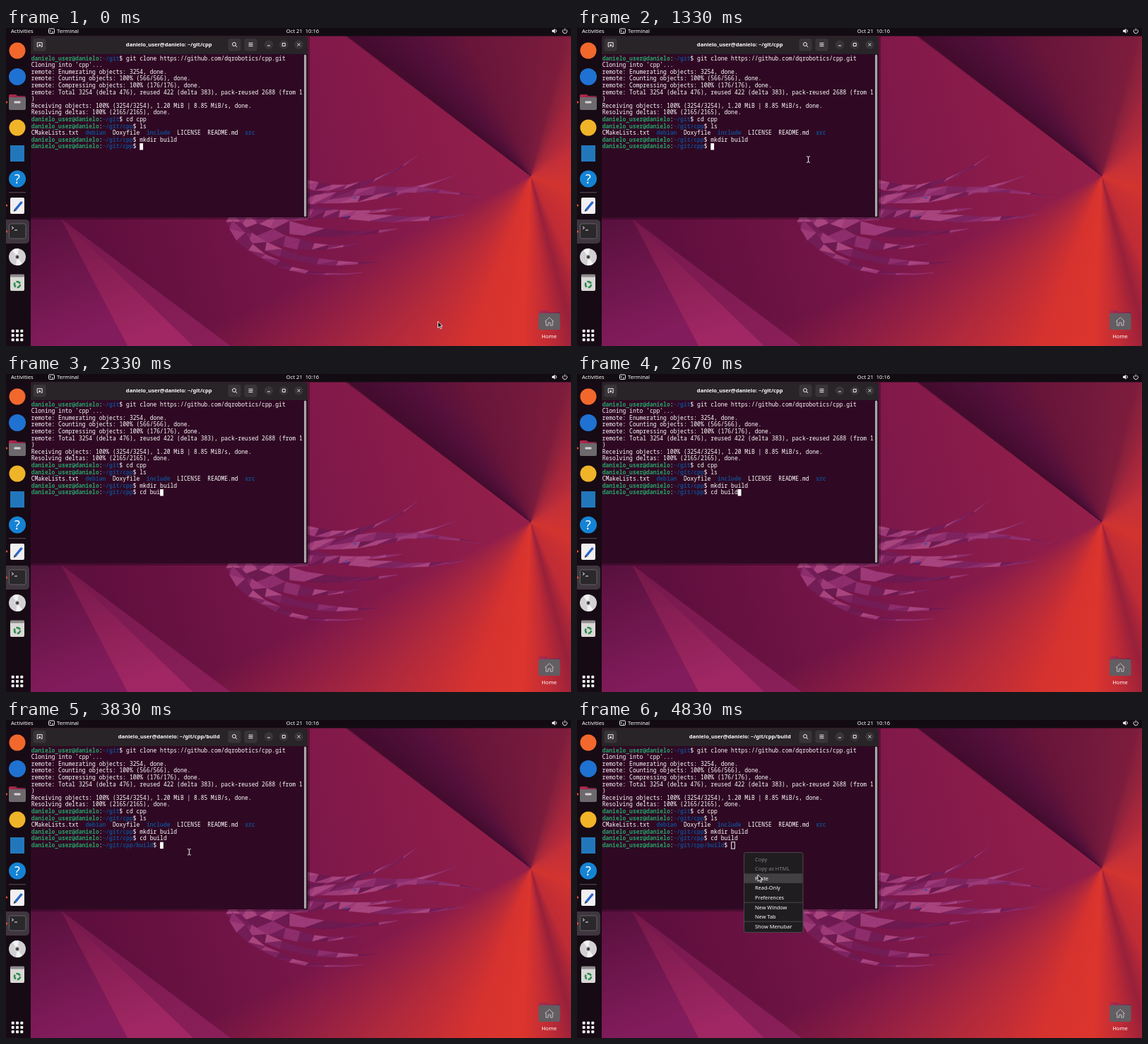
These frames come from a looping animation (800x450 px, 5000 ms). An HTML page:

```html
<!DOCTYPE html>
<html lang="en">
<head>
<meta charset="utf-8">
<title>Terminal session</title>
<style>
html, body { margin: 0; width: 100%; height: 100%; overflow: hidden; background: #120a12; }
/* The wallpaper's folds all meet in one point, so they are an angular gradient. */
svg {
  display: block; width: 800px; height: 450px;
  background:
    conic-gradient(at 743px 210px,
      #751a3c 0deg, #7d1c3c 14deg, #8a213c 18deg, #a3263c 29deg, #c43038 60deg,
      #d2342f 110deg, #c02c35 155deg, #98203a 165deg, #c22c35 174deg, #dc352d 183deg,
      #d6322f 200deg, #b0293c 222deg, #98204a00 245deg, #98204a00 307deg,
      #430b2e 307.5deg, #54103a 320deg, #681539 335deg, #751a3c 360deg),
    linear-gradient(76deg, #5f0f3d 18%, #7b174a 52%, #98204a 92%);
}
text { white-space: pre; fill: #fff; }
.ui { font: 7.6px "Noto Sans", "Open Sans", sans-serif; }
.bold { font-weight: 700; }
.mono { font: 8px "Noto Sans Mono", "DejaVu Sans Mono", monospace; }
.user { fill: #26a269; font-weight: 700; }
.dir { fill: #12488b; font-weight: 700; }
.off { fill: #858285; }
.mid { text-anchor: middle; }
.line { fill: none; stroke: #eee; stroke-width: 1; }
</style>
</head>
<body>
<svg id="stage" viewBox="0 0 800 450">
  <defs>
    <linearGradient id="left" x1="0" y1="0" x2=".3" y2="1">
      <stop offset="0" stop-color="#57103d"/><stop offset="1" stop-color="#831c5c"/>
    </linearGradient>
    <linearGradient id="shard" x1="0" y1="0" x2=".4" y2="1">
      <stop offset="0" stop-color="#741848"/><stop offset="1" stop-color="#a02763"/>
    </linearGradient>
    <linearGradient id="fold" x1="0" y1="0" x2="1" y2="1">
      <stop offset="0" stop-color="#75184d"/><stop offset="1" stop-color="#8b1f5a"/>
    </linearGradient>
    <linearGradient id="folder" x1="0" y1="0" x2="1" y2="0">
      <stop offset="0" stop-color="#b52a4a"/><stop offset="1" stop-color="#7a1f4c"/>
    </linearGradient>
  </defs>

  <g id="wallpaper">
    <path d="M35 268H78L172 450H35Z" fill="url(#left)"/>
    <path d="M78 270L318 450H264Z" fill="url(#fold)"/>
    <path d="M78 270L265 450H172Z" fill="url(#shard)"/>
    <g id="jelly"></g>
  </g>

  <rect width="800" height="11.5" fill="#120c12"/>
  <rect y="11" width="35" height="439" fill="#160b14"/>
  <text class="ui" x="7" y="7.4">Activities</text>
  <rect class="line" x="60.5" y="1" width="8" height="6.5" rx="1.2"/>
  <path class="line" d="M62 3l1.5 1.2L62 5.4M65 5.6h2" stroke-width=".7"/>
  <text class="ui" x="72" y="7.4">Terminal</text>
  <text class="ui mid" x="420" y="7.4">Oct 21  10:16</text>
  <path d="M773 2.8h2l2.4-2v7l-2.4-2h-2z" fill="#eee"/>
  <path class="line" d="M778.6 2.2q1.8 2 0 4"/>
  <path class="line" d="M789.3 2.2a3.1 3.1 0 1 0 4 0M791.3 .6v3.4"/>

  <g id="dock">
    <circle cx="16" cy="32" r="11.5" fill="#f2682c"/>
    <circle cx="16" cy="69" r="12" fill="#1f72d2"/>
    <path d="M4 96q0-2 2-2h8l2 2h10q2 0 2 2v5H4z" fill="url(#folder)"/>
    <rect x="4" y="98" width="24" height="18" rx="2" fill="#6d696d"/>
    <rect x="11.5" y="103.5" width="9" height="3" rx="1" fill="#d6d2d6"/>
    <circle cx="16" cy="141" r="11.5" fill="#f0b429"/>
    <rect x="6" y="166" width="20" height="23" fill="#2277bb"/>
    <circle cx="16" cy="213.5" r="12" fill="#1583d4"/>
    <text class="ui mid" x="16" y="220" style="font-size:18px">?</text>
    <path d="M4 232.7h24" stroke="#5b505a"/>
    <rect x="6" y="240" width="20" height="23" rx="2" fill="#f1eff0"/>
    <path d="M13 257.5L22.5 246" stroke="#2867c9" stroke-width="3.4"/>
    <path d="M10.7 260l1-3.8 2.6 2.4z" fill="#333"/>
    <rect x="-4" y="271" width="37" height="34" rx="5" fill="#403640"/>
    <rect x="4.5" y="277" width="23.5" height="21" rx="2.5" fill="#2b282c" stroke="#646064"/>
    <path class="line" d="M8 281l2.6 1.8L8 284.6M12 286h4"/>
    <circle cx="16" cy="324" r="12" fill="#d2d0d2"/>
    <path d="M16 324L9 314.2A12 12 0 0 1 18 312.2ZM16 324L23 333.8A12 12 0 0 1 14 335.8Z" fill="#f3f2f3"/>
    <circle cx="16" cy="324" r="3.6" fill="#8d898d" stroke="#f5f5f5"/>
    <circle cx="16" cy="324" r="1.5" fill="#2b1b28"/>
    <rect x="6" y="349" width="20" height="23" rx="2" fill="#d9d8d6"/>
    <rect x="6" y="348.5" width="20" height="4" rx="1.5" fill="#8e8b8d"/>
    <circle cx="16" cy="363" r="4" fill="none" stroke="#2d8a4c" stroke-width="2.6" stroke-dasharray="6.4 2"/>
    <g id="marks" fill="#e04a2d"></g>
    <g id="apps" fill="#eee"></g>
  </g>

  <g id="home">
    <path d="M754 402q0-2.5 2.5-2.5h9l2.5 2.5h14q2.5 0 2.5 2.5v5h-30.5z" fill="url(#folder)"/>
    <rect x="754" y="403.5" width="30.5" height="23.5" rx="2.5" fill="#625e62"/>
    <path d="M763 415.5l6.3-6 6.3 6M764.7 414.5v6.500h3v-4h3.200v4h3v-6.500" class="line" style="stroke:#c5bfc3"/>
    <text class="ui mid" x="769" y="438.8">Home</text>
  </g>

  <g id="terminal">
    <path d="M33 12H430V271H33Z" fill="#1b0415" opacity=".35"/>
    <path d="M35 37V17q0-5.5 5.5-5.5H421.500q5.5 0 5.5 5.5V37Z" fill="#282427"/>
    <rect x="35" y="37" width="392" height="231" fill="#2f0923"/>
    <rect x="420.8" y="37" width="6.2" height="231" fill="#1f0a1a"/>
    <rect x="422" y="37.5" width="3.3" height="229.5" rx="1.6" fill="#aaa4a8"/>
    <g fill="#383438">
      <rect x="38.5" y="15" width="18" height="17.5" rx="3"/>
      <rect x="314.5" y="15" width="18" height="17.5" rx="3"/>
      <rect x="337.5" y="15" width="18" height="17.5" rx="3"/>
      <circle cx="372" cy="23.5" r="6.3"/><circle cx="393.3" cy="23.5" r="6.3"/><circle cx="414.5" cy="23.5" r="6.3"/>
    </g>
    <path class="line" d="M46 26.5h-1.8v-5.800h7v5.800h-1.800M47.7 22.5v4M45.8 24.5h3.8" stroke-width=".9"/>
    <circle class="line" cx="323" cy="23" r="2.5"/>
    <path class="line" d="M325 25l2.2 2.2M343.5 21.300h6M343.5 23.500h6M343.5 25.700h6M370 25h4M391.3 21.500h4v4h-4zM412.6 21.6l3.8 3.8M416.4 21.6l-3.8 3.8"/>
    <text id="title" class="ui bold mid" x="230.7" y="26.2"></text>
    <g id="lines" class="mono"></g>
    <rect id="caret" width="4.8" height="9.4"/>
  </g>

  <g id="menu">
    <rect x="236.5" y="187.5" width="83.5" height="113" rx="2.5" fill="#1f1d20" stroke="#4a464a"/>
    <rect id="hover" x="237" y="217.3" width="82.5" height="13.5" fill="#434043"/>
    <path d="M237 258.300h82.500M237 285.200h82.500" stroke="#4a464a"/>
    <g id="items" class="ui" style="font-size:7.4px"></g>
  </g>

  <path id="arrow" d="M0 0V9.300L2.2 7.4L3.8 10.7L5.3 10L3.8 6.900H6.600Z" fill="#171317" stroke="#f2f2f2" stroke-width=".9"/>
  <path id="beam" d="M-2.4 -4.300Q0 -4.3 0 -3Q0 -4.3 2.4 -4.3M0 -3.300V3.300M-2.4 4.300Q0 4.3 0 3Q0 4.3 2.4 4.3" class="line" stroke-width="1.1"/>
</svg>
<script>
const NS = 'http://www.w3.org/2000/svg';
const $ = id => document.getElementById(id);
const HOST = 'danielo_user@danielo';
const COL = 4.8, ROW = 9.6, LEFT = 35.7, LOOP = 5000;

function add(parent, tag, attrs, text) {
  const el = parent.appendChild(document.createElementNS(NS, tag));
  for (const k in attrs) el.setAttribute(k, attrs[k]);
  if (text) el.textContent = text;
  return el;
}
const show = (id, on) => { $(id).style.display = on ? '' : 'none'; };

// Faceted tentacles: tapered ribbons along a curve, split into shaded triangles.
let seed = 11;
const rnd = () => (seed = seed * 16807 % 2147483647) / 2147483647;
const SHADES = ['#6c1a50', '#7d2460', '#8d2d6c', '#9c3a78', '#731d56', '#a8457f'];
const strands = [
  [400, 212, 490, 252, 583, 180, 7], [400, 232, 510, 258, 637, 208, 8],
  [400, 252, 540, 212, 672, 240, 8], [400, 250, 540, 282, 650, 264, 8],
  [370, 262, 460, 268, 560, 255, 9], [335, 258, 430, 306, 555, 284, 11],
  [318, 262, 400, 325, 500, 305, 11], [312, 268, 385, 345, 530, 331, 9],
  [320, 278, 375, 362, 505, 346, 5]
];
for (const [x0, y0, cx, cy, x1, y1, w] of strands) {
  const n = 9, edge = [];
  for (let i = 0; i <= n; i++) {
    const u = i / n, v = 1 - u, half = w * Math.pow(v, .8) * (.7 + .6 * rnd());
    const x = v * v * x0 + 2 * u * v * cx + u * u * x1;
    const y = v * v * y0 + 2 * u * v * cy + u * u * y1;
    edge.push([x + 8 * v * rnd(), y - half], [x - 8 * v * rnd(), y + half]);
  }
  for (let i = 0; i < edge.length - 2; i++) {
    const fill = SHADES[Math.floor(rnd() * SHADES.length)];
    add($('jelly'), 'polygon', {
      points: edge.slice(i, i + 3).map(p => p.map(c => c.toFixed(1))).join(' '),
      fill, stroke: fill, 'stroke-width': .3
    });
  }
}
for (const [x, y] of [[494, 240], [482, 266]]) {
  add($('jelly'), 'path', { d: `M${x - 3} ${y + 1}l3 -2 3 1 -3 1.5z`, fill: '#3550a8' });
}

for (const y of [105, 251, 288]) add($('marks'), 'circle', { cx: .8, cy: y, r: 1.6 });
for (let i = 0; i < 9; i++) {
  add($('apps'), 'rect', { x: 7.7 + i % 3 * 6.3, y: 426.7 + Math.floor(i / 3) * 6.3, width: 4, height: 4, rx: 1 });
}

const prompt = (path, cmd = '') => [[HOST, 'user'], [':'], [path, 'dir'], ['$ ' + cmd]];
function row(i, parts) {
  const el = add($('lines'), 'text', { x: LEFT, y: 45.5 + i * ROW });
  return parts.map(([s, cls]) => add(el, 'tspan', cls ? { class: cls } : {}, s));
}
[
  prompt('~/git', 'git clone https://github.com/dqrobotics/cpp.git'),
  [["Cloning into 'cpp'..."]],
  [['remote: Enumerating objects: 3254, done.']],
  [['remote: Counting objects: 100% (566/566), done.']],
  [['remote: Compressing objects: 100% (176/176), done.']],
  [['remote: Total 3254 (delta 476), reused 422 (delta 383), pack-reused 2688 (from 1']],
  [[')']],
  [['Receiving objects: 100% (3254/3254), 1.20 MiB | 8.85 MiB/s, done.']],
  [['Resolving deltas: 100% (2165/2165), done.']],
  prompt('~/git', 'cd cpp'),
  prompt('~/git/cpp', 'ls'),
  [['CMakeLists.txt  '], ['debian', 'dir'], ['  Doxyfile  '], ['include', 'dir'], ['  LICENSE  README.md  '], ['src', 'dir']],
  prompt('~/git/cpp', 'mkdir build')
].forEach((parts, i) => row(i, parts));
const typed = row(13, prompt('~/git/cpp'))[3];
const last = row(14, prompt('~/git/cpp/build'))[0].parentNode;

[['Copy', 197, 'off'], ['Copy as HTML', 210.5, 'off'], ['Paste', 224], ['Read-Only', 237.5],
 ['Preferences', 251], ['New Window', 265], ['New Tab', 278.2], ['Show Menubar', 292]]
  .forEach(([s, y, cls]) => add($('items'), 'text', { x: 252, y: y + 2.6, class: cls || '' }, s));

// Times below are in ticks of a twelfth of a second.
const KEYS = [18, 20, 22, 24, 26, 28, 30, 32], COMMAND = 'cd build';
const ENTER = 36, WAKE = 42, MENU = 53;
const PATH = [[0, 611.5, 415], [8, 327.5, 186], [42, 327.5, 186], [48, 235.5, 187], [55, 235.5, 187], [58, 256, 219]];

function pointerAt(tick) {
  let i = 0;
  while (i < PATH.length - 2 && tick >= PATH[i + 1][0]) i++;
  const [t0, x0, y0] = PATH[i], [t1, x1, y1] = PATH[i + 1];
  const u = Math.min(1, (tick - t0) / (t1 - t0)), e = u * u * (3 - 2 * u);
  return [x0 + (x1 - x0) * e, y0 + (y1 - y0) * e];
}

function draw(ms) {
  const tick = Math.floor((ms + 5) * 12 / 1000);
  const entered = tick >= ENTER, menu = tick >= MENU;
  const count = KEYS.filter(k => tick >= k).length;

  typed.textContent = '$ ' + COMMAND.slice(0, count);
  last.style.display = entered ? '' : 'none';
  $('title').textContent = HOST + ': ~/git/cpp' + (entered ? '/build' : '');

  const caret = $('caret'), col = entered ? 38 : 32 + count, inset = menu ? .5 : 0;
  caret.setAttribute('x', LEFT + col * COL + inset);
  caret.setAttribute('y', 38.3 + (entered ? 14 : 13) * ROW);
  caret.setAttribute('fill', menu ? 'none' : '#fff');
  caret.setAttribute('stroke', menu ? '#eee' : 'none');

  const [x, y] = pointerAt(tick);
  const visible = tick < KEYS[0] || tick >= WAKE;
  const inText = !menu && x < 421 && y < 268;
  for (const id of ['arrow', 'beam']) $(id).setAttribute('transform', `translate(${x.toFixed(2)} ${y.toFixed(2)})`);
  show('arrow', visible && !inText);
  show('beam', visible && inText);
  show('menu', menu);
  show('hover', y > 217.3);
}

const start = performance.now();
function frame() {
  draw((performance.now() - start) % LOOP);
  requestAnimationFrame(frame);
}
frame();
</script>
</body>
</html>
```
